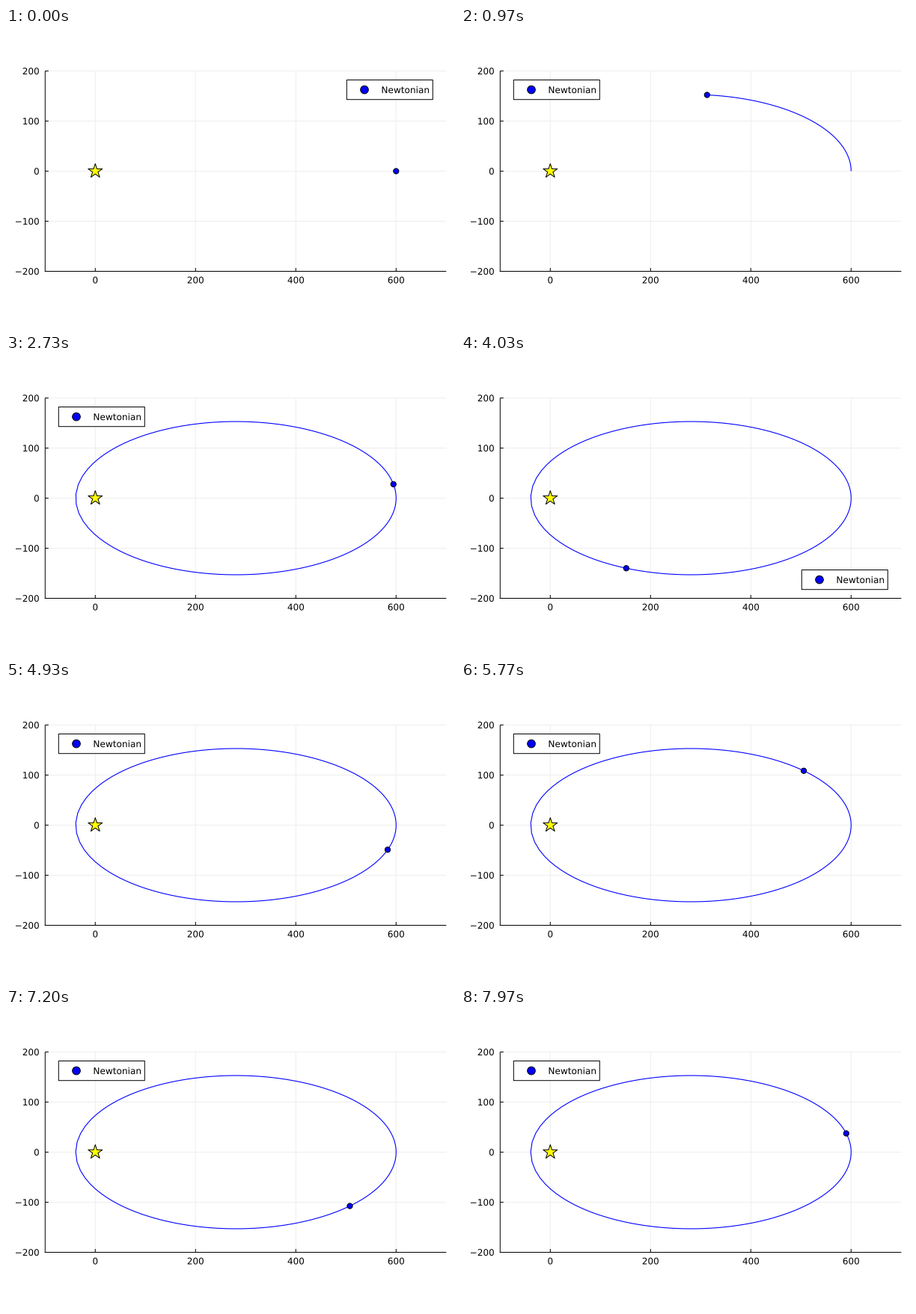
Animation of 600x400 px, one loop 8000 ms. Source, as a matplotlib script:

```python
import numpy as np
import matplotlib.pyplot as plt
from matplotlib.animation import FuncAnimation
from matplotlib.patches import Circle, PathPatch, Polygon, Rectangle
from matplotlib.textpath import TextPath
from matplotlib.transforms import Affine2D

W, H, DPI = 600, 400, 100
LOOP_MS, TICK_MS = 8000, 20
FPS = 30                           # the pose changes 30 times a second
POSES = LOOP_MS * FPS // 1000
PT = 72 / DPI                      # points per pixel

plt.rcParams["font.family"] = "DejaVu Sans"

# orbit: starts at aphelion, sun in the focus at (0, 0)
APHELION, PERIHELION = 600, 39
A = (APHELION + PERIHELION) / 2
C = APHELION - A
B = np.sqrt(APHELION * PERIHELION)
RATE = 0.0808                      # mean anomaly per pose
SUBSTEPS = 5
LAP = round(2 * np.pi / RATE * SUBSTEPS)

# view: data units to pixels
SCALE, X0, Y0 = 0.67, 119.3, 191.5
LEFT, RIGHT = X0 - 100 * SCALE, X0 + 700 * SCALE
TOP, BOTTOM = Y0 - 200 * SCALE, Y0 + 200 * SCALE

# the legend keeps to the corner the trail has crossed least
BOX_W, BOX_H = 115, 26.2
BOX_X = {"l": LEFT + 18, "r": RIGHT - 18 - BOX_W}
BOX_Y = {"t": TOP + 12, "b": BOTTOM - 11.8 - BOX_H}
MOVES = [(0, "tr"), (16, "tl"), (36, "br"), (62, "tl"), (114, "bl"),
         (119, "br"), (139, "tl"), (192, "bl"), (197, "br"), (216, "tl")]


def px(x, y):
    return X0 + SCALE * x, Y0 - SCALE * y


def solve_orbit():
    """Pixel positions along the orbit, SUBSTEPS per pose."""
    mean = RATE * np.arange((POSES - 1) * SUBSTEPS + 1) / SUBSTEPS
    ecc = C / A
    lo, hi = mean - ecc, mean + ecc
    for _ in range(50):
        mid = (lo + hi) / 2
        low = mid + ecc * np.sin(mid) < mean
        lo, hi = np.where(low, mid, lo), np.where(low, hi, mid)
    return px(C + A * np.cos(lo), B * np.sin(lo))


fig = plt.figure(figsize=(W / DPI, H / DPI), dpi=DPI, facecolor="white")
ax = fig.add_axes([0, 0, 1, 1])
ax.set(xlim=(0, W), ylim=(H, 0))
ax.axis("off")


def line(xs, ys, color="black", width=1.0, z=2):
    return ax.plot(xs, ys, color=color, lw=width * PT, zorder=z,
                   snap=False, solid_capstyle="butt")[0]


def shape(patch, color, z):
    patch.set(facecolor=color, edgecolor="black", linewidth=1.0 * PT,
              joinstyle="round", snap=False, zorder=z)
    return ax.add_patch(patch)


def glyphs(text, size=12):
    """Text outline with its baseline start at (0, 0), y pointing down."""
    path = TextPath((0, 0), text, size=size)
    return path.transformed(Affine2D().scale(1, -1))


def label(path, x, y, z=2):
    moved = path.transformed(Affine2D().translate(x, y))
    return ax.add_patch(PathPatch(moved, fc="black", lw=0, zorder=z))


def tick_path(v):
    path = glyphs(str(v).replace("-", "\u2212"))
    return path, path.get_extents()


for v in range(0, 601, 200):
    x, _ = px(v, 0)
    line([x, x], [TOP, BOTTOM], "#eeeeee", z=1)
    line([x, x], [BOTTOM, BOTTOM - 4.5])
    path, ext = tick_path(v)
    label(path, x - (ext.x0 + ext.x1) / 2, 341.5)
for v in range(-200, 201, 100):
    _, y = px(0, v)
    line([LEFT, RIGHT], [y, y], "#eeeeee", z=1)
    line([LEFT, LEFT + 4.5], [y, y])
    path, ext = tick_path(v)
    label(path, 43.9 - ext.x1, y + 4.5)
line([LEFT, LEFT], [TOP, BOTTOM + 0.5])
line([LEFT - 0.5, RIGHT], [BOTTOM, BOTTOM])

path_x, path_y = solve_orbit()
trail = line([], [], "blue", 1.1, z=3)
turn = np.pi * np.arange(10) / 5
radius = np.where(np.arange(10) % 2, 0.382, 1) * 10
shape(Polygon(np.column_stack([X0 + radius * np.sin(turn),
                               Y0 - radius * np.cos(turn)])), "yellow", 4)
planet = shape(Circle((0, 0), 3.6), "blue", 5)

box = shape(Rectangle((0, 0), BOX_W, BOX_H), "white", 6)
key = shape(Circle((0, 0), 5.3), "blue", 7)
word = glyphs("Newtonian", 12.1)
name = label(word, 0, 0, z=7)


def place_legend(x, y):
    box.set_xy((x, y))
    key.center = x + 23.7, y + 13.1
    name.set_path(word.transformed(Affine2D().translate(x + 46.1, y + 17.6)))


def update(i):
    # poses start on the nearest 10 ms
    pose = (i * TICK_MS + 15) * FPS // 1000
    n = pose * SUBSTEPS
    start = max(0, n - LAP)
    trail.set_data(path_x[start:n + 1], path_y[start:n + 1])
    planet.center = path_x[n], path_y[n]
    row, side = [c for first, c in MOVES if first <= pose][-1]
    place_legend(BOX_X[side], BOX_Y[row])
    return trail, planet, box, key, name


anim = FuncAnimation(fig, update, frames=LOOP_MS // TICK_MS, interval=TICK_MS,
                     init_func=lambda: update(0), repeat=True, repeat_delay=0)
plt.show()
```
